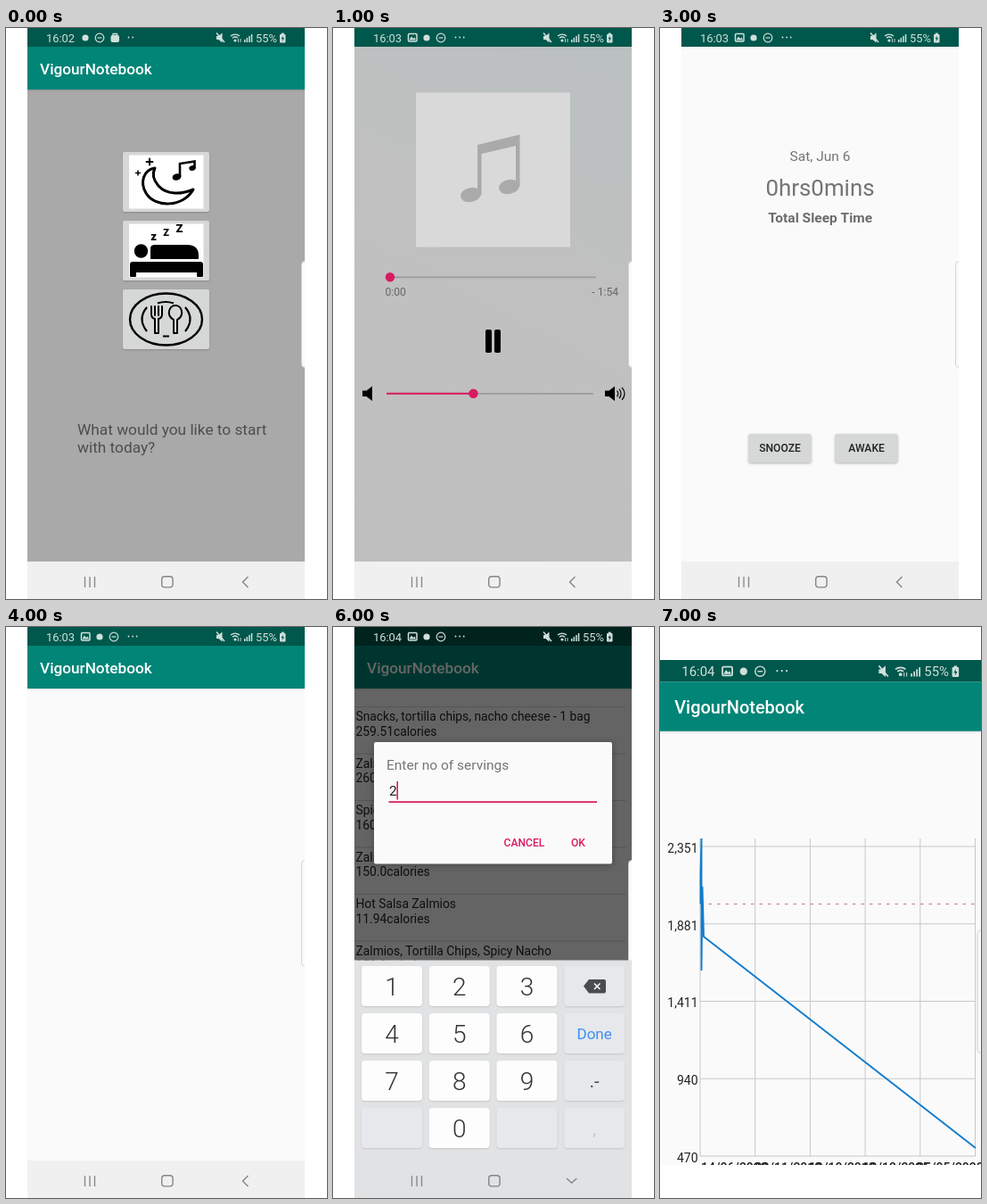
Animation of 360 by 640 pixels, one loop 8000 ms. Source, as an HTML page with a canvas:

```html
<!DOCTYPE html>
<html lang="en">
<head>
<meta charset="utf-8">
<title>Health tracker demo</title>
<style>
html, body { margin: 0; width: 100%; height: 100%; overflow: hidden; background: #fff; }
canvas { display: block; width: 360px; height: 640px; }
</style>
</head>
<body>
<canvas id="stage" width="360" height="640"></canvas>
<script>
const ctx = document.getElementById('stage').getContext('2d');
const APP = 'VigourNotebook';
const PINK = '#d81b60', PAPER = '#fafafa', KEY = '#d6d7d7', INK = '#222';
const LEFT = 24, WIDTH = 311;

const FOODS = [
  ['Snacks, tortilla chips, nacho cheese - 1 oz', '147.14'],
  ['Snacks, tortilla chips, nacho cheese - 1 bag', '259.51'],
  ['Zalmios', '260.0'],
  ['Spicy Sweet Chili Zalmios Chips', '160.0'],
  ['Zalmios, Caribbean Citrus', '150.0'],
  ['Hot Salsa Zalmios', '11.94'],
  ['Zalmios, Tortilla Chips, Spicy Nacho', '150.0'],
  ['Flavored Tortilla Chips, Nacho Cheese', '140.0']
];

function rect(x, y, w, h, color, r = 0) {
  ctx.fillStyle = color;
  ctx.beginPath();
  ctx.roundRect(x, y, w, h, r);
  ctx.fill();
}

function frame(x, y, w, h, color, width, r) {
  ctx.strokeStyle = color;
  ctx.lineWidth = width;
  ctx.beginPath();
  ctx.roundRect(x, y, w, h, r);
  ctx.stroke();
}

function ellipse(x, y, rx, ry, color, turn = 0) {
  ctx.fillStyle = color;
  ctx.beginPath();
  ctx.ellipse(x, y, rx, ry, turn, 0, 7);
  ctx.fill();
}

const dot = (x, y, r, color) => ellipse(x, y, r, r, color);

function ring(x, y, rx, ry, color, width) {
  ctx.strokeStyle = color;
  ctx.lineWidth = width;
  ctx.beginPath();
  ctx.ellipse(x, y, rx, ry, 0, 0, 7);
  ctx.stroke();
}

function fill(d, color) {
  ctx.fillStyle = color;
  ctx.fill(new Path2D(d));
}

function stroke(d, color, width = 1, cap = 'butt') {
  ctx.strokeStyle = color;
  ctx.lineWidth = width;
  ctx.lineCap = cap;
  ctx.lineJoin = cap === 'round' ? 'round' : 'miter';
  ctx.stroke(new Path2D(d));
}

// y is the middle of the capitals
function text(s, x, y, size, color = INK, weight = 400, align = 'left') {
  ctx.font = `${weight} ${size}px Roboto, sans-serif`;
  ctx.textAlign = align;
  ctx.fillStyle = color;
  ctx.fillText(s, x, y + size * 0.355);
}

function shadowed(blur, alpha, draw) {
  ctx.save();
  ctx.shadowColor = `rgba(0,0,0,${alpha})`;
  ctx.shadowBlur = blur;
  ctx.shadowOffsetY = 1;
  draw();
  ctx.restore();
}

function clipped(x, y, w, h, draw) {
  ctx.save();
  ctx.beginPath();
  ctx.rect(x, y, w, h);
  ctx.clip();
  draw();
  ctx.restore();
}

function statusBar(clock, picture, bg = '#00574b') {
  const c = '#cfe0dd';
  rect(LEFT, 0, WIDTH, 21, bg);
  text(clock, 45, 11, 12.9, c);
  let x = 89;
  if (picture) {
    frame(x - 4.5, 6.5, 9.5, 8.5, c, 1.5, 1);
    fill('M85.500 13.500l2.500-4 2 2.500 1.500-1.500 1.500 3z', c);
    x += 16;
  }
  dot(x, 11, 3.6, c);
  x += 16;
  ring(x, 11, 4.8, 4.8, c, 1.2);
  rect(x - 2.5, 10.4, 5, 1.2, c);
  if (!picture) {
    rect(117.5, 8, 9.5, 8, c, 2);
    stroke('M120 8.5V6.5h4.5v2', c, 1.3);
  }
  for (let i = 0; i < (picture ? 3 : 2); i++) dot(137.5 + i * 4.6, 10.5, 0.9, c);

  fill('M236 9h2.5l4-3.5v11l-4-3.5H236z', c);
  stroke('M236 5.5l9 10.5', c, 1.5);
  stroke('M252 9a8 8 0 0 1 10 0M254 11.2a5 5 0 0 1 6 0', c, 1.4);
  dot(257, 14, 1.6, c);
  stroke('M260.5 12v4M263 12v4', c, 0.9);
  [3, 5, 7, 9].forEach((h, i) => rect(267 + i * 2.6, 16 - h, 1.5, h, c));
  text('55%', 280, 11, 12.9, c);
  rect(307, 7, 6.5, 9.5, c, 1);
  rect(308.8, 5.6, 3, 2, c);
  fill('M311 8.5l-2.6 3.8h1.8l-.6 3 2.6-4h-1.8z', bg);
}

function appBar() {
  shadowed(2, 0.12, () => rect(LEFT, 21, WIDTH, 48, '#008577'));
  text(APP, 38, 46, 17.2, '#fff', 500);
}

function handle() {
  rect(331.5, 261.5, 8, 119, PAPER, 4);
  frame(331.5, 261.5, 8, 119, '#d4d4d4', 1, 4);
}

function navBar(keyboard) {
  const c = '#858585';
  rect(LEFT, 598, WIDTH, 42, keyboard ? '#e1e2e3' : '#f0f0f0');
  stroke('M88.5 615v12M94 615v12M99.5 615v12', c, 1.3);
  frame(174.7, 614.7, 12.4, 12.2, c, 1.4, 3.4);
  stroke(keyboard ? 'M262 618l5.7 5 5.7-5' : 'M271.5 615l-6 6 6 6', c, 1.4);
}

// Draws inside the phone, with its bars around the content
function phone(bg, clock, picture, bar, content) {
  clipped(LEFT, 0, WIDTH, 640, () => {
    rect(LEFT, 0, WIDTH, 640, bg);
    content();
    statusBar(clock, picture);
    if (bar) appBar();
    navBar();
    handle();
  });
}

function sparkle(x, y, r) {
  stroke(`M${x - r} ${y}h${2 * r}M${x} ${y - r}v${2 * r}`, '#000', r / 2);
}

function moonIcon() {
  stroke('M167 157C154 159 150 173 157 185C167 202 199 201 210 181C198 186 181 188 171 177C164 169 164 163 167 157Z',
    '#000', 3, 'round');
  sparkle(161, 150, 4.2);
  sparkle(148, 162.5, 3);
  ellipse(191.5, 167, 5, 3.6, '#000', -0.3);
  stroke('M195 167V152l16.5-2.5V157', '#000', 2.6);
  ellipse(209, 157, 3.8, 2.8, '#000', -0.3);
}

function bedIcon() {
  dot(151.5, 250, 7.7, '#000');
  fill('M162 259V247Q162 243 167 243H203Q216 243 216 255V259Z', '#000');
  rect(139, 262, 82, 12, '#000', 3);
  rect(139, 266, 7, 13, '#000', 1);
  rect(214, 266, 7, 13, '#000', 1);
  text('z', 165.5, 233, 13, '#000', 900, 'center');
  text('Z', 179.5, 229.5, 11, '#000', 900, 'center');
  text('Z', 194.5, 224, 13, '#000', 900, 'center');
}

function plateIcon() {
  ring(179.5, 326.5, 40.5, 29, '#000', 2.4);
  stroke('M158 313Q147 326 158 340M201 313Q212 326 201 340M170 308.5Q179 305.5 188 308.5M176 345.5h7', '#000', 2.2);
  stroke('M163 312v9q0 4 4 5v16h4V326q4-1 4-5V312M167 312v10M171 312v10', '#000', 2, 'round');
  stroke('M188 327v15h4V327C201 322 197 311 190 311S179 322 188 327Z', '#000', 2, 'round');
}

function home() {
  phone('#a9a9a9', '16:02', false, true, () => {
    [139, 216, 293].forEach((y, i) => {
      shadowed(2, 0.2, () => rect(131, y, 97, 67, KEY, 2));
      if (i < 2) rect(138, y + 3.5, 83.5, 60, '#fff');
    });
    moonIcon();
    bedIcon();
    plateIcon();
    text('What would you like to start', 80, 449.5, 17.28, 'rgba(0,0,0,.54)');
    text('with today?', 80, 469.8, 17.28, 'rgba(0,0,0,.54)');
  });
}

function slider(x, y, w, part) {
  const knob = x + w * part;
  rect(x, y - 0.8, w, 1.7, '#9c9c9c');
  rect(x, y - 1, knob - x, 2, PINK);
  dot(knob, y, 5.2, PINK);
}

const clockText = s => `${Math.floor(s / 60)}:${String(s % 60).padStart(2, '0')}`;

function player(elapsed) {
  const total = 114;
  const shade = ctx.createLinearGradient(335, 21, 24, 598);
  shade.addColorStop(0, '#bbc0c1');
  shade.addColorStop(0.5, '#c1c0c0');
  shade.addColorStop(1, '#bfbfbf');
  phone(shade, '16:03', true, false, () => {
    rect(93, 72.5, 173, 173, '#d9d9d9');
    fill('M162 131L209.5 119.5V178H205V132L166.5 141V187H162Z', '#aaa');
    ellipse(154.5, 187, 11.5, 8, '#aaa', -0.2);
    ellipse(197.5, 178, 11.5, 8, '#aaa', -0.2);
    slider(64, 279.3, 231, elapsed / total);
    text(clockText(elapsed), 58.5, 296, 12.1, '#666');
    text('- ' + clockText(total - elapsed), 320, 296, 12.1, '#666', 400, 'right');
    rect(171, 338, 7, 26, '#000', 2);
    rect(181, 338, 7, 26, '#000', 2);
    slider(60, 409.8, 232, 0.42);
    fill('M33 406.5h4.5l6.5-5v16.5l-6.5-5H33z', '#000');
    fill('M305 406.5h4.5l6.5-5v16.5l-6.5-5H305z', '#000');
    stroke('M318.5 406.5q2.5 3.3 0 6.6M321 404.5q4 5.3 0 10.6M324 402.8q6 7 0 14', '#000', 1.2);
  });
}

function sleep() {
  phone(PAPER, '16:03', true, false, () => {
    text('Sat, Jun 6', 179.5, 143, 15.5, '#757575', 400, 'center');
    text('0hrs0mins', 179.5, 178.5, 25.9, '#757575', 400, 'center');
    text('Total Sleep Time', 179.7, 212.5, 15.5, '#6c6c6c', 700, 'center');
    [['SNOOZE', 99.5], ['AWAKE', 196.5]].forEach(([label, x]) => {
      shadowed(3, 0.3, () => rect(x, 455, 70, 32, KEY, 2));
      text(label, x + 35, 471, 12.1, INK, 500, 'center');
    });
  });
}

function foods(count, scroll, clock) {
  phone(PAPER, clock, true, true, () => {
    FOODS.slice(0, count).forEach(([name, energy], i) => {
      const y = 121.2 + i * 52.5 - scroll;
      text(name, 25.5, y, 13.82);
      text(energy + 'calories', 25.5, y + 16.5, 13.82);
      if (i < FOODS.length - 1) rect(LEFT, y + 41.3, 304.5, 1, '#d8d8d8');
    });
  });
}

function keypad() {
  rect(LEFT, 373.5, WIDTH, 224.5, '#e1e2e3');
  const keys = ['1', '2', '3', '', '4', '5', '6', 'Done', '7', '8', '9', '.-', '', '0', '', ','];
  keys.forEach((label, i) => {
    const x = 32 + (i % 4) * 75.7, y = 380 + Math.floor(i / 4) * 53;
    const digit = /\d/.test(label), cx = x + 34, cy = y + 23;
    shadowed(2, 0.12, () => rect(x, y, 68, 45, digit ? '#fdfdfd' : '#e6e8ec', 4));
    if (digit) text(label, cx, cy, 28, '#333', 300, 'center');
    else if (label === 'Done') text(label, cx, cy, 17, '#3f8ff0', 400, 'center');
    else if (label) text(label, cx, cy, 20, label === ',' ? '#c3c6cb' : '#444', 400, 'center');
  });
  fill('M281 402.500l6-7.500h17q2 0 2 2v11.500q0 2-2 2H287z', '#4a4d50');
  stroke('M293 399.500l6.500 6.500M299.500 399.500l-6.500 6.500', '#fff', 1.5);
}

function servings() {
  foods(8, 73.5, '16:04');
  rect(LEFT, 0, WIDTH, 598, 'rgba(0,0,0,.6)');
  statusBar('16:04', true, '#00231e');

  shadowed(8, 0.3, () => rect(46, 129, 267, 136.5, PAPER, 2));
  text('Enter no of servings', 60, 154, 15.5, '#757575');
  text('2', 63, 183.7, 15.5, INK);
  rect(71.4, 173, 1.6, 20.5, PINK);
  rect(62.5, 195.3, 233.5, 1.7, PINK);
  text('CANCEL', 191.5, 241.3, 12.1, PINK, 500);
  text('OK', 267, 241.3, 12.1, PINK, 500);
  clipped(LEFT, 0, WIDTH, 640, () => {
    handle();
    keypad();
    navBar(true);
  });
}

function chart() {
  const zoom = 360 / WIDTH;
  clipped(0, 37, 360, 566, () => {
    rect(0, 37, 360, 566, PAPER);
    ctx.save();
    ctx.translate(-LEFT * zoom, 37);
    ctx.scale(zoom, zoom);
    statusBar('16:04', true);
    appBar();
    handle();
    ctx.restore();

    ['2,351', '1,881', '1,411', '940', '470'].forEach((label, i) => {
      const y = 245.5 + i * 86.75;
      rect(45, y, 309, 1, '#c8c8c8');
      text(label, 42.5, y + 2.5, 14, INK, 400, 'right');
    });
    for (let i = 0; i < 6; i++) rect(44.5 + i * 61.7, 237, 1, 356, '#c8c8c8');
    ctx.setLineDash([3.5, 6]);
    stroke('M45 310.500H354', '#c07a82', 1);
    ctx.setLineDash([]);
    stroke('M45.500 310V278L46.500 237V385L47.500 291L49 347L354 584', '#127ccb', 1.9);
    const dates = ['14/06/2020', '02/11/2019', '19/10/2019', '10/12/2025', '25/05/2020'];
    dates.forEach((d, i) => text(d, 46 + i * 60.5, 606, 14, INK, 500));
  });
}

const SCENES = [
  home,
  () => player(0),
  () => player(48),
  sleep,
  () => foods(0, 0, '16:03'),
  () => foods(8, 0, '16:04'),
  servings,
  chart
];

const start = performance.now();

function draw() {
  const t = Math.max(0, performance.now() - start) % 8000;
  rect(0, 0, 360, 640, '#fff');
  SCENES[Math.floor(t / 1000)]();
  requestAnimationFrame(draw);
}
draw();
</script>
</body>
</html>
```
